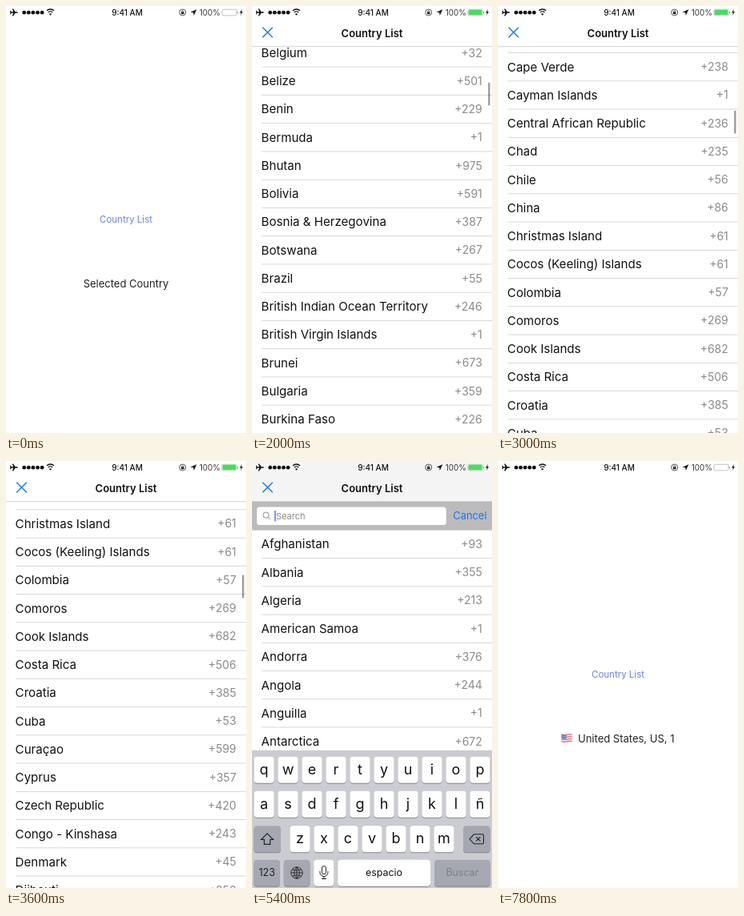
These frames come from a looping animation (300x534 px, 8000 ms). An HTML page with a canvas:

```html
<!DOCTYPE html>
<html lang="en">
<head>
<meta charset="utf-8">
<title>Country picker</title>
<style>
html, body { margin: 0; width: 100%; height: 100%; overflow: hidden; background: #fff; }
canvas { display: block; width: 300px; height: 534px; }
</style>
</head>
<body>
<canvas id="stage"></canvas>
<script>
const W = 300, H = 534, LOOP = 8000, STEP = 200;
const ROW = 35.25, LIST_TOP = 86.6, NAV = 51, KB_TOP = 361;
const BLUE = '#1676f3', GRAY = '#8a8a8f';
const canvas = document.getElementById('stage');
const ctx = canvas.getContext('2d');
const dpr = window.devicePixelRatio || 1;
canvas.width = W * dpr;
canvas.height = H * dpr;

const countries = `Afghanistan 93|Albania 355|Algeria 213|American Samoa 1|Andorra 376|Angola 244|Anguilla 1
Antarctica 672|Antigua & Barbuda 1|Argentina 54|Armenia 374|Aruba 297|Australia 61|Austria 43|Azerbaijan 994
Bahamas 1|Bahrain 973|Bangladesh 880|Barbados 1|Belarus 375|Belgium 32|Belize 501|Benin 229|Bermuda 1|Bhutan 975
Bolivia 591|Bosnia & Herzegovina 387|Botswana 267|Brazil 55|British Indian Ocean Territory 246
British Virgin Islands 1|Brunei 673|Bulgaria 359|Burkina Faso 226|Burundi 257|Cambodia 855|Cameroon 237|Canada 1
Cape Verde 238|Cayman Islands 1|Central African Republic 236|Chad 235|Chile 56|China 86|Christmas Island 61
Cocos (Keeling) Islands 61|Colombia 57|Comoros 269|Cook Islands 682|Costa Rica 506|Croatia 385|Cuba 53|Curaçao 599
Cyprus 357|Czech Republic 420|Congo - Kinshasa 243|Denmark 45|Djibouti 253|Dominica 1|Dominican Republic 1
Ecuador 593|Egypt 20|Estonia 372|Lithuania 370|United Arab Emirates 971|United Kingdom 44|United States 1`
  .split(/[|\n]/).map(s => {
    const cut = s.lastIndexOf(' ');
    return { name: s.slice(0, cut), code: '+' + s.slice(cut + 1) };
  });

const clamp = v => Math.max(0, Math.min(1, v));
const span = (t, a, b) => clamp((t - a) / (b - a));
const easeOut = p => 1 - (1 - p) ** 3;
const easeInOut = p => p * p * (3 - 2 * p);
const mix = (a, b, p) => a + (b - a) * p;

function text(str, x, y, size, color, align = 'left', weight = 400) {
  ctx.font = `${weight} ${size}px Inter, sans-serif`;
  ctx.textAlign = align;
  ctx.fillStyle = color;
  ctx.fillText(str, x, y + size * 0.36);
}

function rect(x, y, w, h, color) {
  ctx.fillStyle = color;
  ctx.fillRect(x, y, w, h);
}

function round(x, y, w, h, r, color) {
  ctx.beginPath();
  ctx.roundRect(x, y, w, h, r);
  ctx.fillStyle = color;
  ctx.fill();
}

function dot(x, y, r, color) {
  ctx.beginPath();
  ctx.arc(x, y, r, 0, 7);
  ctx.fillStyle = color;
  ctx.fill();
}

function shape(d, x, y, color, width = 0) {
  const path = new Path2D(d);
  ctx.save();
  ctx.translate(x, y);
  if (width) {
    ctx.strokeStyle = color;
    ctx.lineWidth = width;
    ctx.stroke(path);
  } else {
    ctx.fillStyle = color;
    ctx.fill(path);
  }
  ctx.restore();
}

function statusBar(green) {
  const ink = '#111';
  shape('M5 0Q5-.8 3.8-.8H1.7L-1-4.5H-2.2L-.9-.8H-3.2L-4.3-2.2H-5.2L-4.6 0L-5.2 2.2H-4.3L-3.2 .8H-.9L-2.2 4.5H-1L1.7 .8H3.8Q5 .8 5 0Z', 10, 8, ink);
  for (let i = 0; i < 5; i++) dot(22.7 + i * 5.6, 8.2, 2.4, ink);
  shape('M-4.4-1.7A6.2 6.2 0 0 1 4.4-1.7M-2.6 .4A3.7 3.7 0 0 1 2.6 .4', 55.5, 7.5, ink, 1.4);
  shape('M-1.6 2.4A2.3 2.3 0 0 1 1.6 2.4L0 4.2Z', 55.5, 7.5, ink);
  text('9:41 AM', 151.5, 8.2, 10, ink, 'center', 500);
  shape('M4 0A4 4 0 1 1-4 0A4 4 0 1 1 4 0M-1.1-.2V-1A1.1 1.1 0 0 1 1.1-1V-.2', 220.7, 8, ink, 0.7);
  rect(219, 7.6, 3.4, 2.6, ink);
  shape('M3.8-3.8L.3 4L-.3 .3L-4 -.3Z', 234.5, 8, ink);
  text('100%', 267.8, 8.2, 9.8, '#333', 'right');
  ctx.beginPath();
  ctx.roundRect(270, 4.3, 18, 7.6, 1.6);
  ctx.strokeStyle = green ? '#69c96d' : '#a9a9a9';
  ctx.lineWidth = 0.7;
  ctx.stroke();
  if (green) round(270.8, 5.1, 16.4, 6, 0.9, '#4cd964');
  round(288.8, 6.7, 1.2, 2.8, 0.6, green ? '#4cd964' : '#a9a9a9');
  shape('M1-4L-2 .6H0L-1 4L2-.8H.2Z', 294, 8, ink);
}

function flag(x, y) {
  const wave = i => Math.sin(i / 13 * 6.28) * 0.5;
  for (let i = 0; i < 13; i++) {
    const top = y + wave(i);
    for (let s = 0; s < 7; s++) rect(x + i, top + s * 1.4, 1.05, 1.45, s % 2 ? '#f3eeee' : '#d8485a');
    if (i < 6) rect(x + i, top, 1.05, 5.6, '#4a62a5');
  }
  for (let i = 0; i < 6; i++) rect(x + 0.8 + i % 3 * 1.8, y + 1.2 + (i > 2) * 2.2, 0.6, 0.6, '#dfe4f2');
}

function home(t) {
  rect(0, 0, W, H, '#fff');
  ctx.globalAlpha = t >= 200 && t < 400 ? 0.3 : 1;
  text('Country List', 150, 267, 11.5, '#6c83e3', 'center');
  ctx.globalAlpha = 1;
  if (t < 7000) text('Selected Country', 150, 347, 13, '#222', 'center');
  else {
    flag(79.5, 341.7);
    text('United States, US, 1', 100, 347, 13, '#222');
  }
}

function offsetAt(t) {
  if (t < 2400) return 1158 * easeInOut(span(t, 1400, 2400));
  if (t < 3600) return mix(1158, 1576.5, easeInOut(span(t, 2400, 3600)));
  return 1576.5 * (1 - easeInOut(span(t, 3600, 4400)));
}

function queryAt(t) {
  return t < 6200 ? '' : 'nit'.slice(0, t < 6600 ? 1 : t < 6800 ? 2 : 3);
}

function magnifier(x) {
  shape('M3 -.8A3.6 3.6 0 1 1-4.2-.8A3.6 3.6 0 1 1 3-.8M2 1.8L5 4.8', x, 68.4, GRAY, 1);
}

function searchBar(active, query, caret) {
  rect(0, NAV, W, LIST_TOP - NAV, '#bbbbbd');
  const right = mix(294, 242.5, active);
  round(6, 57.5, right - 6, 22.5, 3.5, '#fff');
  magnifier(mix(128.5, 17.5, active));
  if (!query) text('Search', mix(140, 29.5, active), 68.8, 11, GRAY);
  else text(query, 28.6, 68.8, 12.4, '#222');
  if (caret) {
    ctx.font = '400 12.4px Inter, sans-serif';
    rect(28.2 + ctx.measureText(query).width, 62, 1.4, 13.5, '#426bf2');
  }
  if (query) {
    dot(230.5, 68.8, 5.6, '#808085');
    shape('M-2-2L2 2M2-2L-2 2', 230.5, 68.8, '#fff', 1.1);
  }
  ctx.globalAlpha = active;
  text('Cancel', mix(302, 251, active), 68.5, 12.9, BLUE);
  ctx.globalAlpha = 1;
}

function list(t, offset, query) {
  const rows = countries.filter(c => c.name.includes(query));
  const first = Math.max(0, Math.floor((offset - ROW) / ROW));
  for (let i = first; i < first + 17; i++) {
    const y = LIST_TOP + i * ROW - offset;
    const row = rows[i];
    if (row) {
      if (t >= 7000 && row.name === 'United States') rect(0, y, W, ROW, '#d9d9d9');
      text(row.name, 11.6, y + 17.3, 15.1, '#111');
      text(row.code, 287.8, y + 17.3, 14, GRAY, 'right');
    }
    rect(12, y + ROW - 0.7, W - 12, 0.8, '#cfced3');
  }
}

function navBar(active) {
  const shade = Math.round(mix(255, 244, active));
  rect(0, 0, W, NAV, `rgb(${shade},${shade},${shade})`);
  rect(0, NAV - 0.5, W, 0.6, '#b3b3b6');
  shape('M-6.3-6.3L6.3 6.3M6.3-6.3L-6.3 6.3', 19.5, 33, BLUE, 1.4);
  text('Country List', 150, 33.9, 13, '#111', 'center', 600);
}

const keyRows = [
  { keys: 'qwertyuiop', x: 15, y: 369 },
  { keys: 'asdfghjklñ', x: 15, y: 412 },
  { keys: 'zxcvbnm', x: 60, y: 455.5 }
];

function key(x, y, w, color = '#fff') {
  round(x, y + 0.9, w, 33, 4, '#85878c');
  round(x, y, w, 33, 4, color);
}

function popup(letter) {
  const row = keyRows.find(r => r.keys.includes(letter));
  const x = row.x + row.keys.indexOf(letter) * 30;
  ctx.save();
  ctx.shadowColor = 'rgba(0,0,0,.3)';
  ctx.shadowBlur = 8 * dpr;
  shape('M-16-52H16Q22.5-52 22.5-45V-17C22.5-8 13-8 13 1V30Q13 34 9 34H-9Q-13 34-13 30V1C-13-8-22.5-8-22.5-17V-45Q-22.5-52-16-52Z', x, row.y, '#fff');
  ctx.restore();
  text(letter, x, row.y - 29.5, 28, '#111', 'center', 300);
}

function keyboard(shown, query, pressed) {
  if (!shown) return;
  const dark = '#a5a8b0';
  ctx.save();
  ctx.translate(0, (1 - shown) * (H - KB_TOP));
  rect(0, KB_TOP, W, H - KB_TOP, '#cbccd2');
  for (const row of keyRows) {
    [...row.keys].forEach((letter, i) => {
      const x = row.x + i * 30;
      key(x - 12.6, row.y, 25.2);
      text(letter, x, row.y + 15.6, 18, '#111', 'center');
    });
  }
  key(2.4, 455.5, 33.6, dark);
  shape('M0-7L7.5 .5H3.7V6.5H-3.7V.5H-7.5Z', 19, 472, '#222', 1.2);
  key(264, 455.5, 33.6, dark);
  shape('M-9 0L-3.5-6H7Q8.5-6 8.5-4.5V4.5Q8.5 6 7 6H-3.5ZM-.8-2.6L4.4 2.6M4.4-2.6L-.8 2.6', 281, 472, '#222', 1.1);

  const y = 498, mid = 514.2;
  key(2.4, y, 32.6, dark);
  text('123', 18.7, mid, 12.4, '#222', 'center');
  key(39.8, y, 32.6, dark);
  shape('M7.2 0A7.2 7.2 0 1 1-7.2 0A7.2 7.2 0 1 1 7.2 0M-7.2 0H7.2M0-7.2V7.2M0-7.2Q-7 0 0 7.2M0-7.2Q7 0 0 7.2M-5.6-4Q0-1.8 5.6-4M-5.6 4Q0 1.8 5.6 4', 56, mid, '#222', 0.9);
  key(77.2, y, 25.2);
  shape('M-2.5-6A2.5 2.5 0 0 1 2.5-6V-.7A2.5 2.5 0 0 1-2.5-.7ZM-5-2V-.5A5 5 0 0 0 5-.5V-2M0 4.5V7.5M-3 7.5H3', 89.9, mid, '#222', 1);
  key(107.2, y, 115.8);
  text('espacio', 165, mid - 0.5, 12.4, '#111', 'center');
  key(228, y, 69.6, query ? '#216ff9' : dark);
  text('Buscar', 262.8, mid - 0.5, 12.4, query ? '#fff' : '#7c818a', 'center');
  if (pressed) popup(pressed);
  ctx.restore();
}

function picker(t) {
  const offset = offsetAt(t);
  const query = queryAt(t);
  const active = easeOut(span(t, 4900, 5500));
  const pressed = { 6000: 'n', 6400: 'i', 6600: 't' }[t];
  rect(0, 0, W, H, '#fff');
  list(t, offset, query);
  ctx.save();
  ctx.translate(0, -offset);
  searchBar(active, query, t >= 5400 && t < 7000);
  ctx.restore();
  navBar(active);
  if (offset > 1) round(295.2, 53 + offset * 0.0568, 2.3, 29, 1.2, 'rgba(0,0,0,.4)');
  keyboard(active, query, pressed);
}

function draw(t) {
  ctx.setTransform(dpr, 0, 0, dpr, 0, 0);
  home(t);
  const up = easeOut(span(t, 250, 850)) * (1 - easeInOut(span(t, 7050, 7700)));
  if (up > 0) {
    ctx.save();
    ctx.translate(0, (1 - up) * H);
    picker(t);
    ctx.restore();
  }
  statusBar(t >= 400 && t < 7600);
}

const start = performance.now();
function tick() {
  const t = (performance.now() - start) % LOOP;
  draw(Math.floor(t / STEP) * STEP);
  requestAnimationFrame(tick);
}
tick();
</script>
</body>
</html>
```
